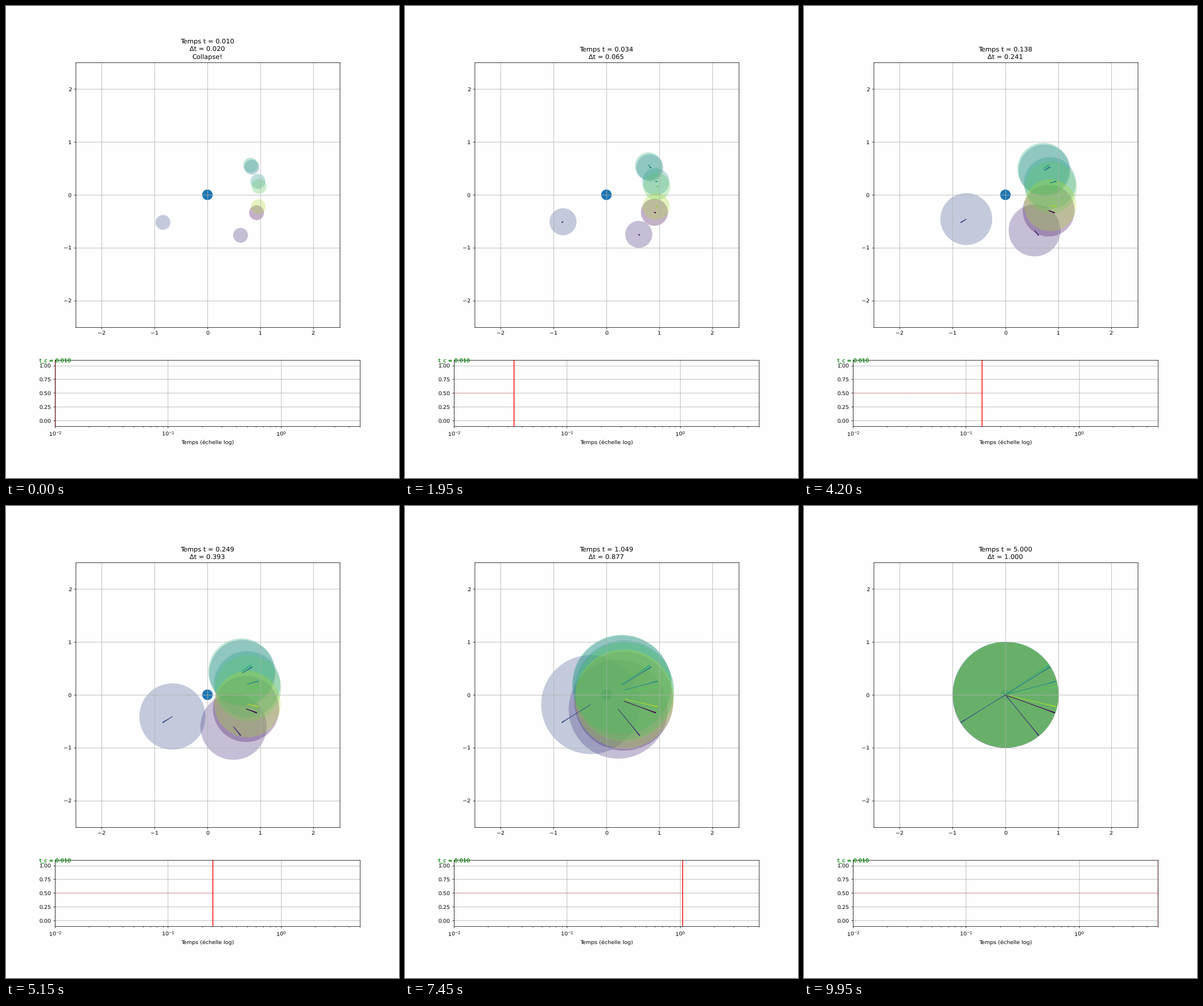
Recreate the animation shown at these times as a matplotlib script. Size 683 by 820 pixels, loop 10000 ms.

```python
import numpy as np
import matplotlib.pyplot as plt
from matplotlib.animation import FuncAnimation
from matplotlib.collections import LineCollection
from matplotlib.patches import Circle

FRAMES, INTERVAL = 200, 50
WIDTH, HEIGHT, DPI = 683, 820, 68.3
PAPER = "#fefefe"
T_START, T_END = 0.01, 5.0

plt.rcParams.update({"text.hinting": "no_hinting", "font.size": 10.05})

# Particles fall radially towards the centre while their spread grows.
times = np.geomspace(T_START, T_END, FRAMES)
spread = 1 - np.exp(-2 * times)
angles = np.radians([-20.0, -50.7, 211.8, 31.9, 14.9, 34.4, 9.2, -13.1])
colors = plt.cm.viridis(np.arange(len(angles)) / len(angles))
directions = np.column_stack([np.cos(angles), np.sin(angles)])
points = np.exp(-times)[:, None, None] * directions
steps = np.stack([points[:-1], points[1:]], axis=2)

# The tiny margin keeps the pixel size from rounding down.
fig, (ax, ax_time) = plt.subplots(
    2, 1, figsize=(WIDTH / DPI + 1e-6, HEIGHT / DPI + 1e-6), dpi=DPI,
    facecolor=PAPER, gridspec_kw={"height_ratios": [4, 1]})

ax.set(xlim=(-2.5, 2.5), ylim=(-2.5, 2.5), aspect=HEIGHT / (1.2 * WIDTH),
       xticks=range(-2, 3), yticks=range(-2, 3), facecolor=PAPER)
ax.grid(True)
ax.add_patch(Circle((0, 0), 0.1, fc="tab:blue", lw=0))
discs = [ax.add_patch(Circle((0, 0), 0.1, fc=c, alpha=0.3, lw=0)) for c in colors]
trails = LineCollection([], colors=colors, linewidths=1.2, alpha=0.5,
                        capstyle="projecting", zorder=2)
ax.add_collection(trails, autolim=False)
title = ax.set_title("", pad=7.3, linespacing=1.31)

ax_time.set_xscale("log")
ax_time.set(xlim=(T_START, T_END), ylim=(-0.1, 1.1),
            yticks=np.linspace(0, 1, 5), xlabel="Temps (échelle log)",
            facecolor=PAPER)
ax_time.grid(True)
level, = ax_time.plot([], [], "r:", lw=1, alpha=0.75)
cursor = ax_time.axvline(T_START, color="red", lw=1.5)
# Two layers give the mark its heavier strokes.
for _ in range(2):
    ax_time.text(T_START, 1.063, f"t_c = {T_START:.3f}", color="green", ha="center")


def update(i):
    t = times[i]
    for disc, center in zip(discs, points[i]):
        disc.center = center
        disc.radius = np.sqrt(spread[i])
    trails.set_segments(list(steps[:i].reshape(-1, 2, 2)))
    label = f"Temps t = {t:.3f}\nΔt = {spread[i]:.3f}"
    title.set_text(label + ("\nCollapse!" if i == 0 else ""))
    cursor.set_xdata([t, t])
    level.set_data([T_START, t], [0.5, 0.5])
    return [*discs, trails, title, cursor, level]


anim = FuncAnimation(fig, update, frames=FRAMES, interval=INTERVAL,
                     repeat=True, repeat_delay=0, blit=False)
plt.show()
```
